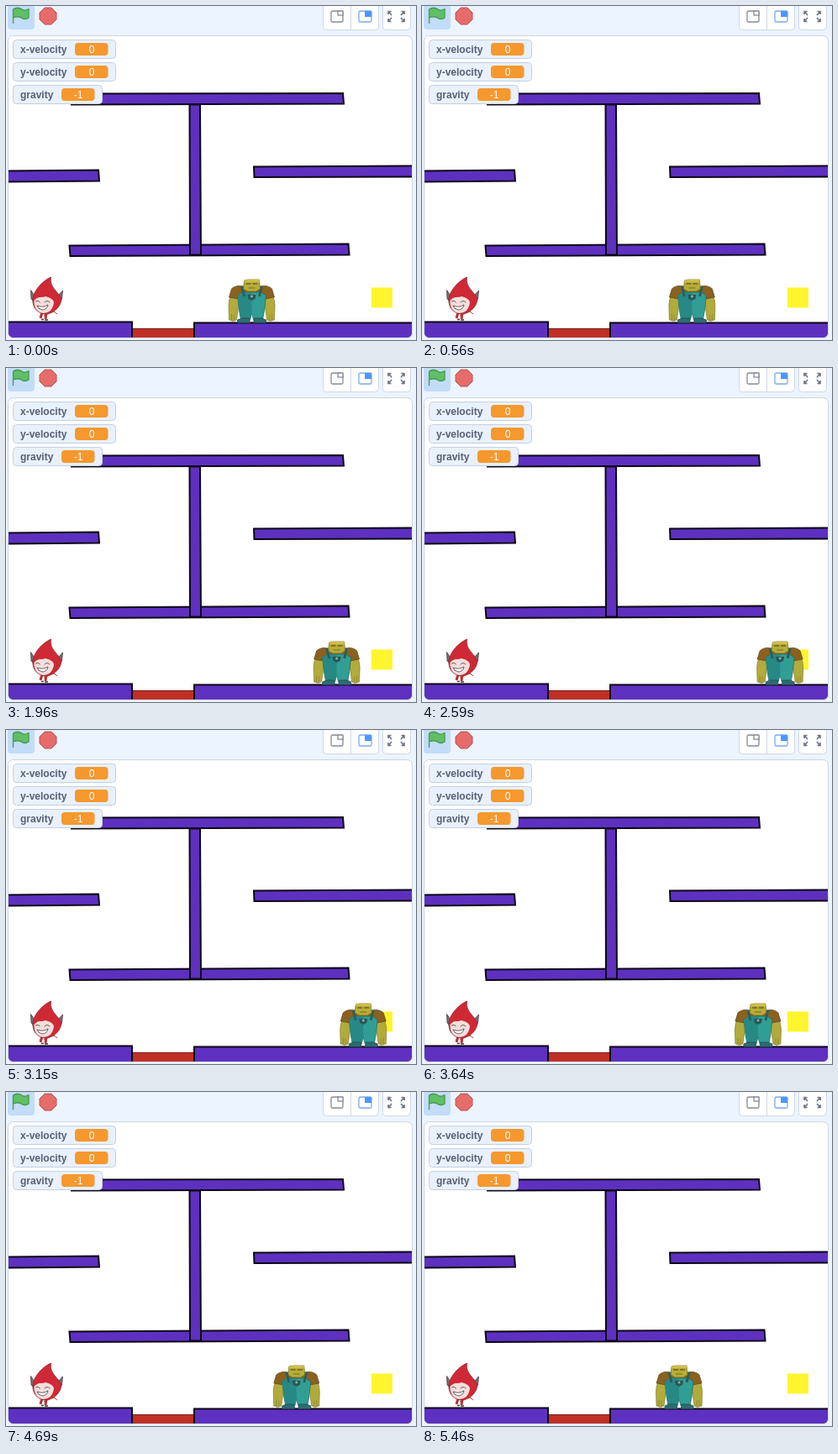
An HTML page that plays this animation: 488 px wide and 398 px high, repeating every 5530 ms.

```html
<!DOCTYPE html>
<html lang="en">
<head>
<meta charset="utf-8">
<title>Platform game</title>
<style>
  html, body { margin: 0; width: 100%; height: 100%; overflow: hidden; background: #ecf4ff; }
  svg { display: block; width: 488px; height: 398px; }
  text { font: bold 12px "Liberation Sans", Arial, sans-serif; fill: #575e75; }
  .value { font-weight: normal; fill: #fff; text-anchor: middle; }
  .panel { fill: #e8f1fd; stroke: #c4d0e0; }
  .button { fill: #fff; stroke: #cfd9e8; }
  .wall { fill: #5e30bf; stroke: #0c0716; stroke-width: 2; }
  .icon { fill: none; stroke: #6b7285; stroke-width: 1.6; }
  .ink { fill: none; stroke: #433; stroke-width: .8; stroke-linecap: round; }
</style>
</head>
<body>
<svg viewBox="0 0 488 398">
  <defs>
    <clipPath id="stageClip"><rect x="2.5" y="35.5" width="481" height="360" rx="6"/></clipPath>
  </defs>

  <!-- toolbar -->
  <rect x="2" y="-5" width="32" height="33" rx="4" fill="#c3dcf8"/>
  <path d="M8.500 21V4C13 1 16 2 19 4S24 5 27 3.500V14C24 16 21 16 18 14S12 12.500 8.500 14" fill="#5fbf67" stroke="#459a4b" stroke-width="1.300" stroke-linejoin="round"/>
  <path d="M46 2h8l6 6v8l-6 6h-8l-6-6V8z" fill="#e66b6b" stroke="#bd5555" stroke-linejoin="round"/>
  <rect class="button" x="377.500" y="-5" width="66" height="33.500" rx="4"/>
  <path d="M410.500 0V28" stroke="#cfd9e8"/>
  <rect class="button" x="448.500" y="-5" width="33" height="33.500" rx="4"/>
  <rect x="387" y="6" width="14" height="13" rx="1.500" fill="#fff" stroke="#858b99" stroke-width="1.300"/>
  <rect x="395" y="6" width="6" height="5" fill="#fff" stroke="#858b99" stroke-width="1.300"/>
  <rect x="420" y="6" width="15" height="13" rx="1.500" fill="#fff" stroke="#79a9ec" stroke-width="1.300"/>
  <path d="M427 6h8v7h-8z" fill="#4c97ff"/>
  <path class="icon" d="M459 11l-3.500-4M470 11l3.500-4M459 14l-3.500 4M470 14l3.500 4M458.500 6.500h-3.500v3.500M470.500 6.500h3.500v3.500M458.500 18.500h-3.500v-3.500M470.500 18.500h3.500v-3.500"/>

  <rect x="2.500" y="35.500" width="481" height="360" rx="6" fill="#fff"/>
  <g clip-path="url(#stageClip)">
    <path d="M150 384.500h74v14h-74z" fill="#c02f25"/>
    <path d="M150 384.500h74" stroke="#7b211c"/>
    <g class="wall">
      <path d="M78 104.500L401 104L402 116.500L78 117.500z"/>
      <path d="M0 196.500L110 195.500L111 208.500L0 209.500z"/>
      <path d="M295 191.500L488 190.500V203.500L295.500 204z"/>
      <path d="M75.500 285.500L407.500 283.500L408.500 296.500L76.500 298z"/>
      <path d="M218.500 117.500H231L232 296.500H219z"/>
      <path d="M-2 376.500H150V402H-2z"/>
      <path d="M224 377.500H490V402H224z"/>
    </g>
    <rect x="435" y="335.500" width="25" height="24" fill="#fff52f"/>

    <!-- imp -->
    <g stroke-linejoin="round">
      <path d="M35 347L29.500 338.500L30 349L36 356zM60 347L67.500 339L66.500 349L60 356z" fill="#777079" stroke="#4b383f" stroke-width=".8"/>
      <path d="M43 365L41 372M48 365L47 373" stroke="#ba3038" stroke-width="3"/>
      <path d="M42 373.500h3M46 374h4" stroke="#613139" stroke-width="1.500"/>
      <path d="M53.500 323C43 328 34 338 32 348C31 358 36 365 45 367C55 367 64 361 66 350C64 341 51 336 53.500 323z" fill="#cf2935" stroke="#8d2830" stroke-width=".8"/>
      <path d="M33.500 351C38 345 44 348 47 346C51 347 56 349 57 353C56 362 51 366 44 366C37 365 33 359 33.500 351z" fill="#f3dfdc"/>
      <path class="ink" d="M35.500 352q3-2 5 1M46 353q3-3 6 0"/>
      <path d="M37 357q7 3 13-1q-1 6-7 6q-5-1-6-5z" fill="#fff" stroke="#523638" stroke-width=".8"/>
      <path d="M45 369l12-5l4 3" fill="none" stroke="#a73b42"/>
    </g>

    <!-- monster, x measured from its centre line -->
    <g id="monster" stroke-linejoin="round">
      <path id="arm" d="M-19 338Q-27 343-27.500 357L-27 374L-22 375.500L-18 374L-16 359L-13 346z" fill="#b2ab3c" stroke="#807a2c" stroke-width=".7"/>
      <use href="#arm" transform="scale(-1 1)"/>
      <path class="ink" d="M-24 367v7M-21 368v6M21 368v6M24 367v7" stroke-opacity=".35"/>
      <path d="M-24 337Q-19 332-10 334H10Q19 332 24 337L27 347L16 349H-16L-27 347z" fill="#8b611f" stroke="#5c431e" stroke-width=".7"/>
      <path d="M-17 345L-11 341H11L17 345L15 363L13 374H2L0 366L-2 374H-13L-15 363z" fill="#319e95" stroke="#23645f" stroke-width=".7"/>
      <path d="M-17 345L-11 341H0V366L-2 374H-13L-15 363z" fill="#278985"/>
      <path d="M-12 334L-9 346M12 334L9 346" stroke="#285f60" stroke-width="3"/>
      <path d="M-5 344H5L4 349L0 351L-4 349z" fill="#2b5554"/>
      <circle cx="0" cy="346" r="1.500" fill="#84b4a9"/>
      <path d="M-17 377.500V374L-12 372H-3L-2 377.500zM17 377.500V374L12 372H3L2 377.500z" fill="#2c6d72" stroke="#25464d" stroke-width=".7"/>
      <path d="M-9 327L-4 326H9L10 337L5 340H-5L-10 337z" fill="#b8ad35" stroke="#756e27" stroke-width=".7"/>
      <path d="M-9 327L-4 326H9L9 329H-9z" fill="#d0bd46"/>
      <path d="M-7 331H-1M1 331H7" stroke="#6b632a" stroke-width="1.500"/>
      <path d="M-4 336H4" stroke="#776c2b"/>
    </g>
  </g>
  <rect x="2.500" y="35.500" width="481" height="360" rx="6" fill="none" stroke="#cbd5e3"/>
  <g id="monitors"></g>
</svg>

<script>
  const LOOP = 5530, STEP = 70;
  const START = 292.5, SPEED = 0.0516, TURN = 2861;
  const monster = document.getElementById("monster");

  const monitor = (label, value, y, width, pillX) => `
    <rect class="panel" x="8.5" y="${y + .5}" width="${width}" height="22" rx="4"/>
    <text x="17" y="${y + 16}">${label}</text>
    <rect x="${pillX}" y="${y + 4}" width="39.5" height="15" rx="4" fill="#f6982d"/>
    <text class="value" x="${pillX + 20}" y="${y + 15.5}">${value}</text>`;

  document.getElementById("monitors").innerHTML =
    monitor("x-velocity", 0, 40, 122, 82) +
    monitor("y-velocity", 0, 67, 122, 82) +
    monitor("gravity", -1, 94, 106, 66);

  // The monster patrols at constant speed, turning once near the right edge.
  function draw() {
    const t = Math.floor(performance.now() % LOOP / STEP) * STEP;
    const x = START + SPEED * (TURN - Math.abs(t - TURN));
    monster.setAttribute("transform", `translate(${x.toFixed(2)} 0)`);
    requestAnimationFrame(draw);
  }
  draw();
</script>
</body>
</html>
```
